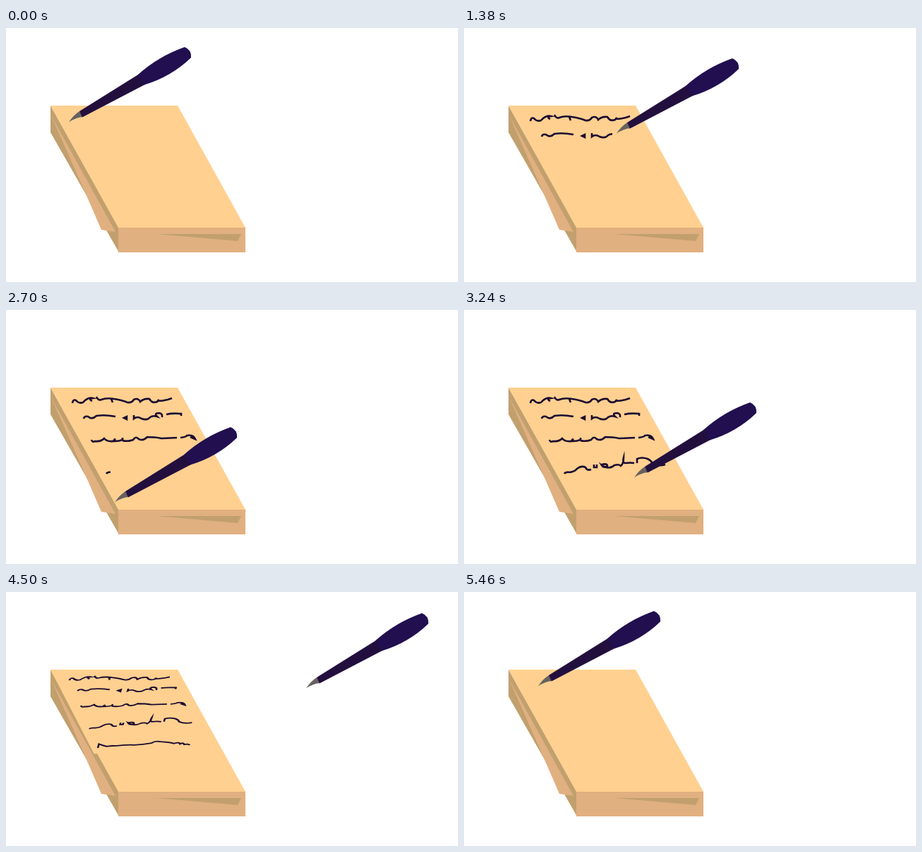
These frames come from a looping animation (640 by 360 pixels, 5520 ms). An HTML page with a canvas:

```html
<!DOCTYPE html>
<html lang="en">
<head>
<meta charset="utf-8">
<title>Pen and notepad</title>
<style>
  html, body { margin: 0; width: 100%; height: 100%; overflow: hidden; background: #fff; }
  canvas { display: block; }
</style>
</head>
<body>
<canvas id="stage" width="640" height="360"></canvas>
<script>
const ctx = document.getElementById('stage').getContext('2d');
const LOOP = 5520, STEP = 60;
const PAPER = '#ffd090', SHADE = '#c1a06e', FRONT = '#e1b080', INK = '#1a0830';
const TIP_X = 89;

// Pen offset from its starting place: [ms, x, y]
const penKeys = [
  [0, 0, 0], [600, 129, -5], [660, 142, -6],
  [860, 7, 23], [1380, 127, 16], [1500, 154, 14],
  [1690, 27, 57], [1800, 51, 55], [2220, 147, 50], [2340, 174, 48],
  [2400, 153, 67], [2640, 48, 146], [3150, 193, 87],
  [3240, 152, 104], [3390, 52, 145], [3600, 113, 136], [4020, 200, 132],
  [4140, 213, 130], [4200, 243, 110], [4440, 336, 3],
  [5040, 336, 3], [5460, 16, 0], [LOOP, 0, 0]
];

const line = (start, end, d) => ({ start, end, path: new Path2D(d) });
const lines = [
  line(0, 660, 'M94 132Q95 126 99 128Q103 133 109 131Q116 123 123 125Q116 126 122 129' +
    'M128 123Q131 129 135 127Q142 124 153 126M149 126L151 131M153 126Q165 128 172 131' +
    'Q178 132 181 127Q187 124 190 130Q195 125 203 126Q207 133 214 130Q217 126 215 129Q222 129 229 127L235 125'),
  line(860, 1500, 'M110 154Q111 150 116 151Q122 156 128 150Q140 148 155 151M167 153L171 151V155Z' +
    'M181 149V154Q186 150 192 154Q200 157 204 152Q208 149 214 151Q209 146 217 146Q222 147 221 152' +
    'M227 148Q235 146 248 147V150'),
  line(1690, 2340, 'M121 184Q122 188 126 186Q134 187 139 182Q143 187 152 186Q155 180 154 186' +
    'Q160 186 165 184V181M165 185Q172 187 180 184Q184 178 188 183Q194 186 200 180Q212 180 220 182L242 181' +
    'M247 181Q255 180 256 178Q265 176 268 183L261 180'),
  line(2640, 3150, 'M142 232Q144 229 150 230Q157 229 160 225Q166 220 172 223Q174 228 180 226' +
    'M184 219V223H188V219M195 219Q203 217 203 221Q198 225 195 220Q205 227 213 220Q219 218 222 221' +
    'Q226 218 226 209Q224 216 228 217Q236 216 241 217M245 217V211Q252 208 260 211Q266 214 266 217Q275 222 285 219'),
  line(3390, 4020, 'M162 271V263Q168 266 174 268Q182 266 186 267Q200 264 212 265Q225 264 236 261' +
    'Q240 256 248 258Q262 259 268 262Q275 258 277 263Q281 259 283 264Q288 262 291 265')
];

const fill = (color, d) => {
  ctx.fillStyle = color;
  ctx.fill(new Path2D(d));
};

function penAt(t) {
  const i = penKeys.findIndex(key => key[0] > t);
  const [t0, x0, y0] = penKeys[i - 1], [t1, x1, y1] = penKeys[i];
  const k = (t - t0) / (t1 - t0);
  return [x0 + (x1 - x0) * k, y0 + (y1 - y0) * k];
}

function drawTopPage() {
  fill(PAPER, 'M63 110H243L339 283H159Z');
}

function drawPad() {
  fill(SHADE, 'M63 110L160 283V318L63 148Z');
  fill(FRONT, 'M159 282H339V318H159Z');
  fill(FRONT, 'M64 124L155 289L135 286L112 233Z');
  fill(SHADE, 'M213 292H333L328 302Z');
  drawTopPage();
}

function drawWriting(t, penX) {
  ctx.strokeStyle = INK;
  ctx.lineWidth = 2.6;
  for (const { start, end, path } of lines) {
    if (t <= start) continue;
    ctx.save();
    if (t < end) {
      ctx.beginPath();
      ctx.rect(0, 0, TIP_X + penX - 6, 360);
      ctx.clip();
    }
    ctx.stroke(path);
    ctx.restore();
  }
}

// The written sheet turns over about the top edge of the pad.
function drawSheet(t, penX) {
  if (t >= 5040) return;
  const k = Math.min(1, Math.max(0, (t - 4320) / 660));
  const skew = -126 * k / 173, scale = 1 - 197 * k / 173;
  ctx.save();
  ctx.transform(1, 0, skew, scale, -110 * skew, 110 - 110 * scale);
  if (k > 0) drawTopPage();
  drawWriting(t, penX);
  ctx.restore();
}

function drawPen(x, y) {
  ctx.save();
  ctx.translate(x, y);
  fill('#66625f', 'M89 133.500Q95 124 104 118L109 126Q98 127 89 133.500Z');
  fill('#230f3e', 'M104 118L188 65.500L197 80L108 126.500Z');
  fill('#210f50', 'M187 66Q216 40 253 27Q263 31 262 42Q234 69 196 80.500Z');
  ctx.restore();
}

function draw(now) {
  const t = Math.floor(now % LOOP / STEP) * STEP;
  const [x, y] = penAt(t);
  ctx.fillStyle = '#fff';
  ctx.fillRect(0, 0, 640, 360);
  drawPad();
  drawSheet(t, x);
  drawPen(x, y);
}

let origin;
function tick(now) {
  origin ??= now;
  draw(now - origin);
  requestAnimationFrame(tick);
}
draw(0);
requestAnimationFrame(tick);
</script>
</body>
</html>
```
